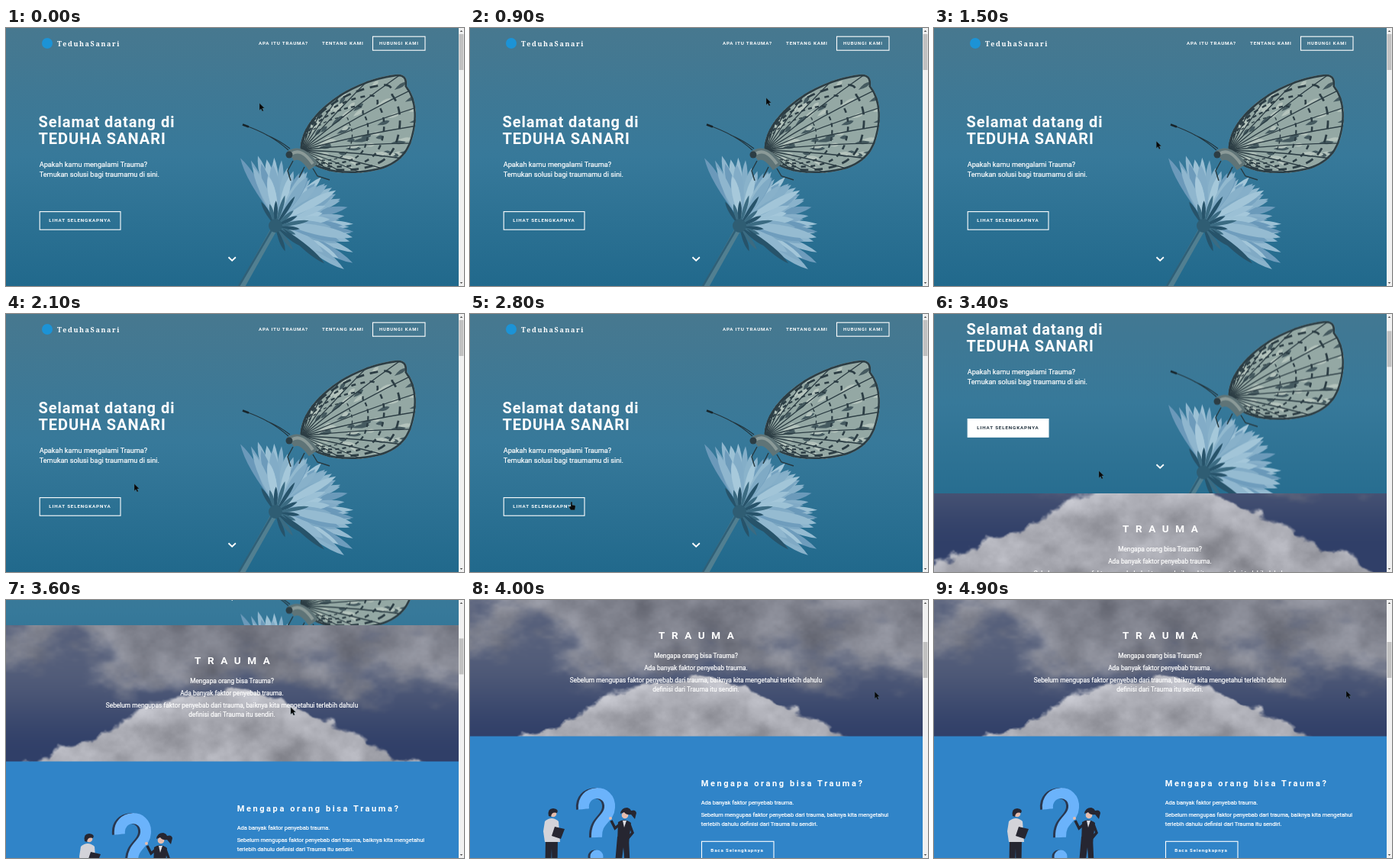
Animation of 600x338 px, one loop 5 s. Source, as an HTML page with a canvas:

```html
<!DOCTYPE html>
<html lang="id">
<head>
<meta charset="utf-8">
<title>Teduha Sanari</title>
<style>
html, body { margin: 0; width: 100%; height: 100%; overflow: hidden; background: #3084c8; }
canvas, svg { position: absolute; left: 0; top: 0; width: 600px; height: 338px; display: block; }
text { font-family: Roboto, Arial, sans-serif; fill: #fff; white-space: pre; }
.b { font-weight: 700; }
.h1 { font-size: 20px; letter-spacing: .96px; }
.lead { font-size: 9.2px; }
.nav { font-size: 6.25px; letter-spacing: .78px; }
.contact { font-size: 5.8px; letter-spacing: .9px; }
.btn { font-size: 6.25px; letter-spacing: .85px; }
.brand { font: 700 9px "Noto Serif", serif; letter-spacing: 1.6px; }
.h2 { font-size: 13.5px; letter-spacing: 8.6px; }
.mid { font-size: 8.33px; text-anchor: middle; }
.h3 { font-size: 11px; letter-spacing: 2.6px; }
.p { font-size: 7.476px; }
.lead, .mid, .p { stroke: #fff; stroke-width: .22px; }
.box { fill: none; stroke: #fff; stroke-width: 1.1; }
</style>
</head>
<body>
<canvas id="stage" width="600" height="338"></canvas>
<svg viewBox="0 0 600 338">
  <g id="page">
    <circle cx="54" cy="20" r="7" fill="#1c93d6"/>
    <text class="brand" x="67" y="23.5">TeduhaSanari</text>
    <text class="b nav" x="331" y="22">APA ITU TRAUMA?</text>
    <text class="b nav" x="414" y="22">TENTANG KAMI</text>
    <rect class="box" x="480.5" y="11.2" width="68.5" height="18"/>
    <text class="b contact" x="489" y="22.3">HUBUNGI KAMI</text>
    <text class="b h1" x="42.5" y="129.8">Selamat datang di</text>
    <text class="b h1" x="42.5" y="151.8">TEDUHA SANARI</text>
    <text class="lead" x="43.7" y="182.3">Apakah kamu mengalami Trauma?</text>
    <text class="lead" x="43.7" y="194.8">Temukan solusi bagi traumamu di sini.</text>
    <rect class="box" id="more" x="44.2" y="240.6" width="105.8" height="23.6"/>
    <text class="b btn" id="moreText" x="56.3" y="254.3">LIHAT SELENGKAPNYA</text>
    <path d="M291.5 300.2l4.7 4.4 4.7-4.4" fill="none" stroke="#fff" stroke-width="1.9"/>

    <text class="b h2" x="247" y="389">TRAUMA</text>
    <text class="mid" x="296" y="413.7">Mengapa orang bisa Trauma?</text>
    <text class="mid" x="296" y="430">Ada banyak faktor penyebab trauma.</text>
    <text class="mid" x="296" y="446">Sebelum mengupas faktor penyebab dari trauma, baiknya kita mengetahui terlebih dahulu</text>
    <text class="mid" x="296" y="458">definisi dari Trauma itu sendiri.</text>

    <text class="b h3" x="302.7" y="582">Mengapa orang bisa Trauma?</text>
    <text class="p" x="302.7" y="605.6">Ada banyak faktor penyebab trauma.</text>
    <text class="p" x="302.7" y="621.6">Sebelum mengupas faktor penyebab dari trauma, baiknya kita mengetahui</text>
    <text class="p" x="302.7" y="633.6">terlebih dahulu definisi dari Trauma itu sendiri.</text>
    <rect class="box" x="303.5" y="654.3" width="94.5" height="24"/>
    <text class="b btn" x="315.3" y="667.8">Baca Selengkapnya</text>
  </g>
  <rect x="593" width="7" height="338" fill="#f1f1f1"/>
  <rect id="thumb" x="593.6" width="5.8" height="47" fill="#c1c1c1"/>
  <path d="M594.7 5l1.8-2 1.8 2zM594.7 333l1.8 2 1.8-2z" fill="#505050"/>
  <g id="arrow"><path d="M0 0V9.2L2.1 7.2 3.7 10.6 5.3 9.9 3.8 6.6H6.6Z" fill="#080808" stroke="#5d8090" stroke-width=".3"/></g>
  <g id="hand"><path d="M-.9 0Q0-1.2.9 0V3.5L4.2 4.3Q5.2 4.7 5 6L4.3 10.3H-1L-3.4 6.2Q-3.2 4.8-.9 6.2Z" fill="#080808" stroke="#5d8090" stroke-width=".3"/></g>
</svg>
<script>
const W = 593, H = 338, BAND = 178.5, LOOP = 5000, STEP = 100;
const DARK = '#2c3d44', SUIT = '#262631', SKIN = '#e5bdae';
const $ = id => document.getElementById(id);
const ctx = $('stage').getContext('2d');
const mix = (a, b, k) => a + (b - a) * k;
const clamp = v => Math.min(1, Math.max(0, v));
const smooth = v => (v = clamp(v)) * v * (3 - 2 * v);

function layer(w, h, paint) {
  const c = document.createElement('canvas');
  c.width = w; c.height = h;
  paint(c.getContext('2d'), w, h);
  return c;
}

function seeded(s) {
  return () => (s = (s * 16807) % 2147483647) / 2147483647;
}

function fill(g, d, color) {
  g.fillStyle = color;
  g.fill(new Path2D(d));
}

function stroke(g, d, color, width) {
  g.strokeStyle = color;
  g.lineWidth = width;
  g.stroke(new Path2D(d));
}

function dot(g, x, y, r, color) {
  g.beginPath();
  g.arc(x, y, r, 0, 7);
  g.fillStyle = color;
  g.fill();
}

// Pointed petal from (x, y) along an angle
function leaf(g, x, y, angle, len, w, color) {
  g.save();
  g.translate(x, y);
  g.rotate(angle);
  fill(g, `M0 0Q${len * .7} ${-w} ${len} 0Q${len * .7} ${w} 0 0`, color);
  g.restore();
}

function paintFlower(g) {
  const rnd = seeded(23);
  stroke(g, 'M352 262Q332 297 307 342', '#517f91', 8);
  stroke(g, 'M349 263Q328 299 304 340', '#2f6078', 2.5);
  for (let i = 0; i < 64; i++) {
    const a = mix(-2.1, .62, i < 24 ? i / 23 : rnd());
    const len = (74 + 24 * Math.abs(a + 1.15)) * mix(1, i < 24 ? .88 : .6, rnd());
    const v = rnd() * 62;
    leaf(g, 356, 254, a, len, 8 + rnd() * 5, `rgb(${105 + v},${152 + v * .8},${185 + v * .55})`);
  }
  for (let i = 0; i < 13; i++) leaf(g, 353, 260, mix(-2.1, 1.2, i / 12), 26 + rnd() * 22, 5, i % 2 ? '#3b6b82' : '#27536a');
  leaf(g, 362, 262, .7, 72, 7, '#27536a');
  dot(g, 353, 259, 9, '#2f5d73');
}

function paintButterfly(g) {
  const rnd = seeded(8), x = 388, y = 160;
  const wing = new Path2D('M386 160C384 118 445 69 510 61Q527 59 525 76C540 95 540 125 530 152C520 176 498 188 458 190C428 191 405 185 390 170Z');
  g.save();
  g.clip(wing);
  g.fillStyle = '#94a8a4';
  g.fillRect(370, 50, 180, 150);
  for (let i = 0; i < 90; i++) {
    const a = mix(-1.3, .6, rnd()), r = 20 + rnd() * 140;
    leaf(g, x + r * Math.cos(a), y + r * Math.sin(a), a, 10 + rnd() * 14, 5, i % 5 < 2 ? '#455a60' : '#b4c3bc');
  }
  g.strokeStyle = DARK;
  for (let k = 1; k > .3; k -= .14) {
    g.save();
    g.translate(x, y);
    g.scale(k, k);
    g.translate(-x, -y);
    g.setLineDash(k == 1 ? [] : [7 + rnd() * 9, 5 + rnd() * 7]);
    g.lineWidth = k == 1 ? 5 : 3 + rnd() * 2;
    g.stroke(wing);
    g.restore();
  }
  for (let a = -1.4; a < .8; a += .15) {
    const c = Math.cos(a), s = Math.sin(a);
    stroke(g, `M${x} ${y}Q${x + 90 * c} ${y + 90 * s - 6} ${x + 180 * c} ${y + 180 * s}`, DARK, 1.3);
  }
  g.restore();
  stroke(g, 'M373 168Q386 158 403 182', '#5f7477', 15);
  stroke(g, 'M374 165Q387 156 402 178', '#8b9a98', 4);
  dot(g, 371, 166, 4.5, DARK);
  stroke(g, 'M370 160Q347 139 311 127M372 158Q358 147 341 140', '#22343c', 1.2);
  stroke(g, 'M310 126.5L318 129.5', '#18252b', 2.6);
  stroke(g, 'M376 174L369 187 373 200M391 182L384 196M402 184L408 194 424 199', '#26383f', 1.4);
}

const hero = layer(W, H, (g, w, h) => {
  const grad = g.createLinearGradient(0, 0, 0, h);
  ['#47788f', '#37799a', '#21698c'].forEach((c, i) => grad.addColorStop(i / 2, c));
  g.fillStyle = grad;
  g.fillRect(0, 0, w, h);
  paintFlower(g);
  paintButterfly(g);
});

// Value noise, summed over octaves
function hash(x, y) {
  const v = Math.sin(x * 127.1 + y * 311.7) * 43758.55;
  return v - Math.floor(v);
}

function noise(x, y) {
  const i = Math.floor(x), j = Math.floor(y), u = smooth(x - i), v = smooth(y - j);
  return mix(mix(hash(i, j), hash(i + 1, j), u), mix(hash(i, j + 1), hash(i + 1, j + 1), u), v);
}

function fbm(x, y) {
  let sum = 0;
  for (let k = 0, f = 1; k < 5; k++, f *= 2) sum += noise(x * f + k * 17, y * f) / (2 * f);
  return sum;
}

const clouds = layer(W, 260, (g, w, h) => {
  const img = g.createImageData(w, h);
  const grey = v => [v, v + 1, v + 9];
  for (let y = 0, p = 0; y < h; y++) {
    for (let x = 0; x < w; x++, p += 4) {
      const n = fbm(x / 90, y / 55), m = fbm(x / 45 + 40, y / 38 + 9);
      const low = smooth((y - 60) / 130);
      const sky = [mix(84, 48, low), mix(94, 63, low), mix(122, 104, low)];
      const veil = smooth((95 - y) / 90 + (n - .45) * 3);
      const top = 97 + Math.abs(x - 290) ** 1.25 * .095;
      const mound = smooth((y - top + (m - .5) * 50) / 7);
      const bright = 158 + (m - .5) * 95 + 20 * clamp(1 - (y - top) / 45);
      for (let c = 0; c < 3; c++) {
        const back = mix(sky[c], grey(92 + 90 * m)[c], veil * .85);
        img.data[p + c] = mix(back, grey(bright)[c], mound);
      }
      img.data[p + 3] = 255;
    }
  }
  g.putImageData(img, 0, 0);
});

function paintPeople(g) {
  const mark = 'M148 273C145 246 184 245 182 271C181 287 164 287 165 310';
  for (const [dx, color] of [[-2, '#2a3850'], [1, '#6bb3fb']]) {
    g.save();
    g.translate(dx, 1);
    stroke(g, mark, color, 14);
    dot(g, 165, 335, 8.5, color);
    g.restore();
  }
  fill(g, 'M99 312H115L114 380H108L107 325 105 380H98Z', SUIT);
  fill(g, 'M98 290Q107 282 116 290L118 317H98L96 303Z', '#d3d3d9');
  fill(g, 'M111 297L124 300 119 313 107 309Z', SUIT);
  dot(g, 109, 280, 4.3, SKIN);
  fill(g, 'M103 283Q101 273 109 273Q117 274 114 279Q107 277 106 284Z', SUIT);

  fill(g, 'M193 310H208L211 380H205L201 324 194 380H187Z', SUIT);
  fill(g, 'M194 291Q202 285 211 292L208 318H193Z', SUIT);
  stroke(g, 'M196 294L190 299 185 289M209 294L213 305 207 312', SUIT, 3.5);
  dot(g, 184, 286, 2, SKIN);
  fill(g, 'M200 289H205L202 298Z', '#dddde3');
  dot(g, 203, 282, 4.3, SKIN);
  fill(g, 'M197 280Q198 272 206 272Q210 273 211 276Q217 274 218 279L216 287 211 281Q205 282 202 278Z', SUIT);
}

// Pointer stops: time, x, y
const stops = [[0, 332, 98.5], [900, 388, 91.5], [2100, 168, 222.5], [2700, 133, 246.5], [3150, 133, 246.5],
  [3400, 216, 205.5], [3600, 373, 140.5], [4100, 540, 119], [LOOP, 540, 119]];

const slope = (i, n) => (stops[i + 1][n] - stops[i][n]) / (stops[i + 1][0] - stops[i][0]);

function tangent(i, n) {
  if (i == 0 || i == stops.length - 1) return 0;
  const a = slope(i - 1, n), b = slope(i, n);
  return a * b <= 0 ? 0 : 2 * a * b / (a + b);
}

function pointer(t) {
  const i = stops.findLastIndex(s => s[0] <= t);
  const [p, q] = [stops[i], stops[i + 1]], d = q[0] - p[0], u = (t - p[0]) / d;
  return [1, 2].map(n => mix(p[n], q[n], smooth(u)) +
    d * u * (1 - u) * ((1 - u) * tangent(i, n) - u * tangent(i + 1, n)));
}

const scrollAt = t => Math.round(H * (1 - Math.cos(Math.PI * clamp((t - 3225) / 470))) / 2);

function clipped(y, h, paint) {
  ctx.save();
  ctx.beginPath();
  ctx.rect(0, y, W, h);
  ctx.clip();
  paint();
  ctx.restore();
}

function draw(t) {
  const s = scrollAt(t), top = H - s;
  ctx.fillStyle = '#3084c8';
  ctx.fillRect(0, 0, 600, H);
  // Both photos scroll at half speed
  clipped(0, top, () => ctx.drawImage(hero, 0, -s / 2));
  clipped(top, BAND, () => ctx.drawImage(clouds, 0, top / 2));
  clipped(top + BAND, H, () => {
    ctx.translate(0, top);
    paintPeople(ctx);
  });

  $('page').setAttribute('transform', `translate(0 ${-s})`);
  $('thumb').setAttribute('y', 8 + s * 47 / H);
  const k = clamp((t - 2850) / 250);
  $('more').style.fill = `rgba(255,255,255,${k})`;
  $('moreText').style.fill = `rgb(${mix(255, 32, k)},${mix(255, 48, k)},${mix(255, 60, k)})`;

  const [x, y] = pointer(t);
  const over = x > 44 && x < 150 && y > 240 - s && y < 264 - s;
  for (const id of ['arrow', 'hand']) {
    $(id).setAttribute('transform', `translate(${x} ${y})`);
    $(id).style.display = (id == 'hand') == over ? '' : 'none';
  }
}

const start = performance.now();
function tick() {
  const t = (performance.now() - start) % LOOP;
  draw(Math.floor(t / STEP) * STEP);
  requestAnimationFrame(tick);
}
tick();
</script>
</body>
</html>
```
